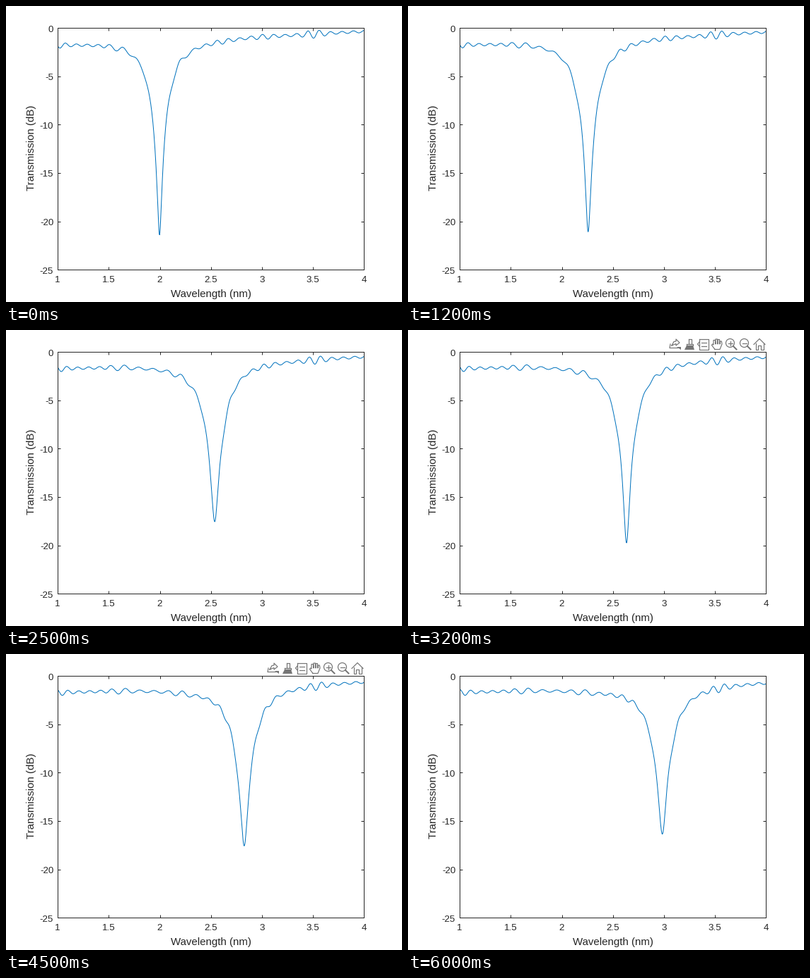
Recreate the animation shown at these times as a matplotlib script. Size 560 by 420 pixels, loop 6.1 s.

```python
import matplotlib.pyplot as plt
import numpy as np
from matplotlib.animation import FuncAnimation
from matplotlib.patches import Circle, Polygon
from matplotlib.transforms import ScaledTranslation

plt.rcParams["font.family"] = "Liberation Sans"
plt.rcParams["axes.unicode_minus"] = False

W, H, DPI = 560, 420, 100
PX = 72 / DPI                      # one pixel in points
LEFT, RIGHT, TOP, BOTTOM = 73.2, 506.2, 31.2, 374.2
SCALE = (RIGHT - LEFT) / 3         # pixels per nm
FRAMES, STEP = 61, 100
INK, BLUE, GREY = "#262626", "#0072BD", "#757575"

# Background: mean level and ripple phase against pixel column
LEVEL = [(70, -1.68), (160, -1.45), (260, -1.4), (345, -0.87),
         (410, -0.67), (506, -0.33)]
PHASE = [(53, -2), (84, 0), (145.5, 4), (266, 10), (491, 24), (523, 26)]
# Places where the ripple swells: column, extra amplitude
SWELLS = [(70, 0.2), (158, 0.19), (243, 0.18), (305, 0.14),
          (365, 0.15), (435, 0.3)]

# Motion keys of the notch: frame, value
CENTRE = [(0, 1.997), (7, 2.128), (17, 2.387), (25, 2.539),
          (39, 2.729), (51, 2.923), (60, 2.985)]
DEPTH = [(0, -21.4), (7, -23.5), (17, -18.65), (25, -17.55), (32, -19.75),
         (39, -18.4), (51, -16.75), (56, -19.1), (60, -16.35)]
TOOLBAR = range(32, 50)

wave = np.linspace(1, 4, 867)


def keyed(keys, x):
    return np.interp(x, *zip(*keys))


def background(x, i):
    """Rippled level in dB; the ripple drifts slowly to longer wavelengths."""
    t = i / (FRAMES - 1)
    col = 73 + (x - 1) * SCALE - 4.5 * t
    amp = 0.12 + sum(h * np.exp(-((col - c) / 12) ** 2 / 2) for c, h in SWELLS)
    ripple = amp * np.cos(2 * np.pi * keyed(PHASE, col))
    return keyed(LEVEL, col) + ripple - 0.25 * t * np.clip(x - 2, 0, 1)


def spectrum(i):
    """Background with a resonance notch of Lorentzian shape."""
    c = keyed(CENTRE, i)
    g2 = (0.19 - 0.025 * np.exp(-i / 10)) ** 2
    floor = 10 ** ((keyed(DEPTH, i) - background(c, i)) / 10)
    d2 = (wave - c) ** 2
    return background(wave, i) + 10 * np.log10((d2 + floor * g2) / (d2 + g2))


fig = plt.figure(figsize=(W / DPI, H / DPI), dpi=DPI, facecolor="white")
ax = fig.add_axes([LEFT / W, 1 - BOTTOM / H,
                   (RIGHT - LEFT) / W, (BOTTOM - TOP) / H])
ax.set(xlim=(1, 4), ylim=(-25, 0))
xticks, yticks = np.arange(1, 4.1, 0.5), range(-25, 1, 5)
ax.set_xticks(xticks, [f"{v:g}" for v in xticks])
ax.set_yticks(yticks, [str(v) for v in yticks])
ax.tick_params(direction="in", top=True, right=True, length=4 * PX, width=PX,
               color=INK, labelcolor=INK, labelsize=13.33 * PX)
ax.tick_params(axis="x", pad=8.8 * PX)
ax.tick_params(axis="y", pad=6 * PX)
lower = ScaledTranslation(0, -1 / DPI, fig.dpi_scale_trans)
for text in ax.get_yticklabels():
    text.set_transform(text.get_transform() + lower)
for spine in ax.spines.values():
    spine.set(linewidth=PX, edgecolor=INK)
curve, = ax.plot(wave, spectrum(0), color=BLUE, lw=PX)

label = dict(color=INK, fontsize=15 * PX, ha="center")
fig.text(290 / W, 1 - 413 / H, "Wavelength (nm)", va="baseline", **label)
fig.text(36 / W, 1 - 201.5 / H, "Transmission (dB)", va="center",
         rotation=90, **label)

# Toolbar, drawn in pixel coordinates
bar = fig.add_axes([0, 0, 1, 1], facecolor="none")
bar.axis("off")


def stroke(*pts, lw=1.2):
    bar.plot(*zip(*pts), color=GREY, lw=lw * PX, solid_joinstyle="round")


def fill(*pts):
    bar.add_patch(Polygon(pts, fc=GREY, ec="none"))


def box(x0, y0, x1, y1):
    stroke((x0, y0), (x1, y0), (x1, y1), (x0, y1), (x0, y0))


def export_icon():
    stroke((371, 20), (370, 25.5), (382, 25.5))
    stroke((373, 22), (376, 16.5), (379, 16), (379, 13),
           (384, 18), (379, 22), (379, 19.5), (373, 22))
    fill((380, 24), (386, 24), (386, 28))


def brush_icon():
    box(397, 13, 400.5, 19.5)
    box(394, 19.5, 403, 22)
    fill((394, 22), (403, 22), (405, 28), (391, 28))


def tip_icon():
    box(412, 12.5, 424.5, 27.5)
    stroke((412, 17), (409.5, 20), (412, 23))
    for y in (17.5, 22.5):
        stroke((415, y), (422, y))


def hand_icon():
    outline = [(434, 27.5), (429.5, 21.5), (430.5, 20), (432, 21)]
    for k, top in enumerate((14.5, 13, 13.5, 16)):
        x = 432 + 3 * k
        outline += [(x, 20), (x, top), (x + 2.4, top), (x + 3, 20)]
    stroke(*outline, (441, 27.5), (434, 27.5))


def lens_icon(x, plus):
    bar.add_patch(Circle((x, 18.5), 6, fill=False, ec=GREY, lw=1.2 * PX))
    stroke((x + 4.3, 22.8), (x + 9, 27.5), lw=2)
    stroke((x - 3, 18.5), (x + 3, 18.5))
    if plus:
        stroke((x, 15.5), (x, 21.5))


def home_icon():
    stroke((489, 20.5), (497, 12.5), (505, 20.5))
    stroke((491.5, 19), (491.5, 27.5), (495, 27.5), (495, 22), (499, 22),
           (499, 27.5), (502.5, 27.5), (502.5, 19))


export_icon()
brush_icon()
tip_icon()
hand_icon()
lens_icon(455.5, True)
lens_icon(475.5, False)
home_icon()
bar.set(xlim=(0, W), ylim=(H, 0))


def draw(i):
    curve.set_ydata(spectrum(i))
    bar.set_visible(i in TOOLBAR)
    return curve, bar


anim = FuncAnimation(fig, draw, frames=FRAMES, interval=STEP, repeat=True)
plt.show()
```
